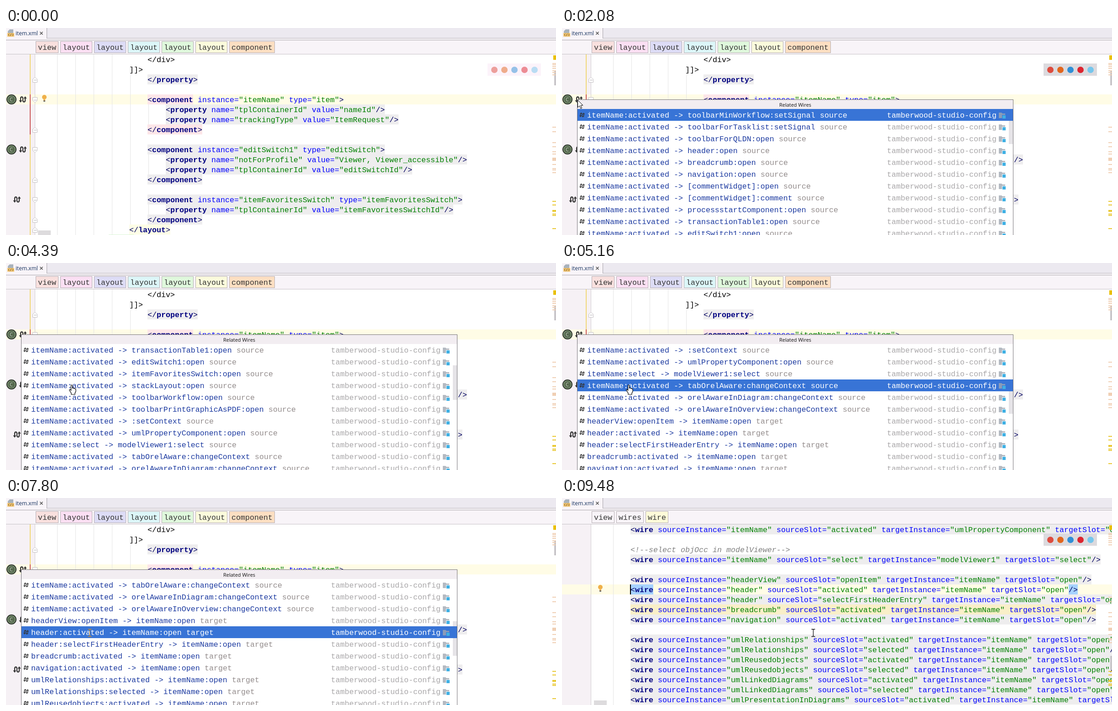
These frames come from a looping animation (1205 px wide and 455 px high, 9560 ms). An HTML page with a canvas:

```html
<!DOCTYPE html>
<html lang="en">
<head>
<meta charset="utf-8">
<title>Related wires</title>
<style>
  html, body { margin: 0; width: 100%; height: 100%; overflow: hidden; background: #fff; }
  canvas { display: block; }
</style>
</head>
<body>
<canvas id="stage" width="1205" height="455"></canvas>
<script>
const ctx = document.getElementById('stage').getContext('2d');
const LOOP = 9560, W = 1205, H = 455, CHAR = 10, LINE = 22, ROW = 26;
const POPUP_OPEN = 1935, POPUP_CLOSE = 7890, CRUMBS_CHANGE = 8220;
const MONO = '16.667px "Liberation Mono", monospace';
const SANS = '"Open Sans", "Noto Sans", sans-serif';
const GREY = '#eeedee', PINK = '#fde6e8', CURRENT = '#fffce6', PICKED = '#a6d2ff';

// ---------- content ----------
const component = (name, type) => `<component instance="${name}" type="${type}">`;
const property = (name, value) => `<property name="${name}" value="${value}"/>`;
const wire = (from, slot, to = 'itemName', target = 'open') =>
  `<wire sourceInstance="${from}" sourceSlot="${slot}" targetInstance="${to}" targetSlot="${target}"/>`;

// Line number, x, text, background
const layoutLines = [
  [0, 310, '</div>'],
  [1, 270, ']]>'],
  [2, 310, '</property>', GREY],
  [4, 310, component('itemName', 'item')],
  [5, 350, property('tplContainerId', 'nameId'), GREY],
  [6, 350, property('trackingType', 'ItemRequest'), GREY],
  [7, 310, '</component>', PINK],
  [9, 310, component('editSwitch1', 'editSwitch'), GREY],
  [10, 350, property('notForProfile', 'Viewer, Viewer_accessible'), GREY],
  [11, 350, property('tplContainerId', 'editSwitchId'), GREY],
  [12, 310, '</component>', GREY],
  [14, 310, component('itemFavoritesSwitch', 'itemFavoritesSwitch'), GREY],
  [15, 350, property('tplContainerId', 'itemFavoritesSwitchId'), GREY],
  [16, 310, '</component>', GREY],
  [17, 270, '</layout>', '#fdfde6']
];

const wireLines = [
  [0, wire('itemName', 'activated', 'umlPropertyComponent')],
  [2, '<!--select objOcc in modelViewer-->'],
  [3, wire('itemName', 'select', 'modelViewer1', 'select')],
  [5, wire('headerView', 'openItem')],
  [6, wire('header', 'activated')],
  [7, wire('header', 'selectFirstHeaderEntry')],
  [8, wire('breadcrumb', 'activated')],
  [9, wire('navigation', 'activated')],
  [11, wire('umlRelationships', 'activated')],
  [12, wire('umlRelationships', 'selected')],
  [13, wire('umlReusedobjects', 'activated')],
  [14, wire('umlReusedobjects', 'selected')],
  [15, wire('umlLinkedDiagrams', 'activated')],
  [16, wire('umlLinkedDiagrams', 'selected')],
  [17, wire('umlPresentationInDiagrams', 'activated')]
].map(([n, text]) => [n, 150, text, n === 2 || n === 6 ? null : n === 8 ? '#f9efc8' : GREY]);

const outgoing = `toolbarMinWorkflow:setSignal toolbarForTasklist:setSignal toolbarForQLDN:open
  header:open breadcrumb:open navigation:open [commentWidget]:open [commentWidget]:comment
  processstartComponent:open transactionTable1:open editSwitch1:open itemFavoritesSwitch:open
  stackLayout:open toolbarWorkflow:open toolbarPrintGraphicAsPDF:open :setContext
  umlPropertyComponent:open modelViewer1:select tabOrelAware:changeContext
  orelAwareInDiagram:changeContext orelAwareInOverview:changeContext`.split(/\s+/);
const incoming = `headerView:openItem header:activated header:selectFirstHeaderEntry
  breadcrumb:activated navigation:activated umlRelationships:activated
  umlRelationships:selected umlReusedobjects:activated`.split(/\s+/);
const entries = [
  ...outgoing.map(o => [`itemName:${o.endsWith(':select') ? 'select' : 'activated'} -> ${o}`, 'source']),
  ...incoming.map(i => [`${i} -> itemName:open`, 'target'])
];

// ---------- timeline ----------
const selection = [[0, 0], [2840, 1], [3025, 2], [3205, 3], [5160, 18], [5940, 21], [6990, 22]];
const scrolling = [[0, 0], [3600, 3], [3990, 6], [4390, 9], [4620, 12], [4850, 15], [5470, 18]];
const valueAt = (keys, t) => keys.filter(k => k[0] <= t).pop()[1];

// First step, last step, number of steps, end x, end y, shape
const moves = [
  [370, 610, 3, 393, 289, 'beam'],
  [990, 1365, 4, 112, 190, 'beam'],
  [1490, 1490, 1, 40, 164, 'arrow'],
  [1790, 1790, 1, 35, 157, 'hand'],
  [1935, 1935, 1, 34, 158, 'arrow'],
  [2570, 3210, 8, 144, 268, 'hand'],
  [5160, 5160, 1, 146, 268, 'hand'],
  [5940, 5940, 1, 148, 267, 'hand'],
  [6030, 6330, 3, 160, 267, 'hand'],
  [6720, 7260, 5, 182, 295, 'hand'],
  [7650, 7650, 1, 183, 297, 'beam'],
  [8220, 9090, 11, 550, 297, 'beam']
];

function pointerAt(t) {
  let x = 1035, y = 478, shape = 'beam';
  for (const [start, end, steps, toX, toY, kind] of moves) {
    if (t < start) break;
    const gap = (end - start) / Math.max(1, steps - 1);
    const done = Math.min(steps, gap ? Math.floor((t - start) / gap + 1.01) : 1) / steps;
    x += (toX - x) * done;
    y += (toY - y) * done;
    shape = kind;
  }
  return { x: Math.round(x), y: Math.round(y), shape };
}

const ramp = (t, start, length) => Math.max(0, Math.min(1, (t - start) / length));
const panelAlpha = t => ramp(t, 990, 250) - ramp(t, 4070, 230) + ramp(t, 8220, 280);

// ---------- drawing helpers ----------
function rect(x, y, w, h, color) {
  ctx.fillStyle = color;
  ctx.fillRect(x, y, w, h);
}

function text(str, x, y, color, font = MONO) {
  ctx.font = font;
  ctx.fillStyle = color;
  ctx.fillText(str, x, y);
}

function circle(x, y, r, color) {
  ctx.fillStyle = color;
  ctx.beginPath();
  ctx.arc(x, y, r, 0, 7);
  ctx.fill();
}

function shape(path, x, y, { fill, stroke, width = 1, scale = 1 }) {
  const outline = new Path2D(path);
  ctx.save();
  ctx.translate(x, y);
  ctx.scale(scale, scale);
  ctx.lineWidth = width;
  if (fill) { ctx.fillStyle = fill; ctx.fill(outline); }
  if (stroke) { ctx.strokeStyle = stroke; ctx.stroke(outline); }
  ctx.restore();
}

function wireIcon(x, y, scale = 1) {
  shape('M-5 4V-2Q-5-5.5-2.5-5.5T0-2V2Q0 5.5 2.5 5.5T5 2V-4', x, y, { stroke: '#333', width: 2.3, scale });
  shape('M-8.5 2H-1.5L-5 7ZM1.5-2H8.5L5-7Z', x, y, { fill: '#333', scale });
}

function bulb(y) {
  circle(84, y - 2, 5, '#efb04a');
  rect(82, y + 3, 4, 2, '#efb04a');
  rect(82, y + 5, 4, 3, '#77736f');
}

const lineTop = n => 58 + LINE * n;

function codeLine([n, x, str, background]) {
  const y = lineTop(n), baseline = y + 17;
  if (background) rect(x, y, str.length * CHAR, LINE, background);
  if (str.startsWith('<!--')) return text(str, x, baseline, '#808080', 'italic ' + MONO);
  if (str === '</div>' || str === ']]>') return text(str, x, baseline, '#000');
  let afterBracket = false;
  for (const token of str.match(/"[^"]*"|<\/?|\/?>|\w+|./g)) {
    const color = token[0] === '"' ? '#008000' : afterBracket ? '#000080'
      : /[\w=]/.test(token) ? '#0000ff' : '#000060';
    text(token, x, baseline, color, (afterBracket ? 'bold ' : '') + MONO);
    x += token.length * CHAR;
    afterBracket = token[0] === '<';
  }
}

// ---------- scene parts ----------
function header(t) {
  rect(0, 0, W, 57, '#f8f4f8');
  rect(90, 0, W - 90, 22, '#ece9f0');
  rect(90, 22, W - 90, 1, '#b5b2b8');
  rect(89, 0, 1, 23, '#a5a2a8');
  rect(0, 26, W, 1, '#aaa7ac');
  rect(0, 57, W, 1, '#c6c2c6');

  shape('M8 3H16V11H4V7Z', 0, 0, { fill: '#a9b3bc' });
  rect(3, 11, 15, 8, '#f2c46f');
  shape('M7.5 12.5L5 15L7.5 17.5M13.5 12.5L16 15L13.5 17.5M11.5 12.5L9.5 17.5', 0, 0, { stroke: '#6a5530' });
  text('item.xml', 21, 16, '#14305e', '12px ' + SANS);
  shape('M-3-3L3 3M3-3L-3 3', 77.5, 11.5, { stroke: '#555', width: 1.6 });

  const crumbs = t < CRUMBS_CHANGE
    ? [['view', '#f9e0de'], ['layout', '#fbdff3'], ['layout', '#dddcf6'], ['layout', '#dcf6f8'],
       ['layout', '#dff8dc'], ['layout', '#fbfbdc'], ['component', '#fddfc2']]
    : [['view', '#f8f4f8'], ['wires', '#f8f4f8'], ['wire', '#fefbd9']];
  let x = 65;
  for (const [label, color] of crumbs) {
    const width = label.length * CHAR + 10;
    rect(x, 29, width, 26, '#b5aeb2');
    rect(x + 1, 30, width - 2, 24, color);
    text(label, x + 5, 48, '#333');
    x += width + 4;
  }
}

function gutter(currentLine) {
  rect(0, 58, 63, H, '#f6f1f5');
  rect(0, lineTop(currentLine), W, LINE, CURRENT);
  rect(63, 58, 1, H, '#d0ccd0');
  rect(112, 58, 1, H, '#e4e4e4');
}

function layoutEditor(showsBulb) {
  gutter(4);
  for (const x of [152, 192, 232]) rect(x, 58, 1, H, '#e4e4e4');
  rect(272, 104, 1, 330, '#e4e4e4');
  for (const [y, h] of [[168, 44], [278, 44], [388, 22]]) rect(312, y, 1, h, '#e4e4e4');
  rect(52, 58, 2, H, '#f0d878');
  rect(52, 146, 2, 88, '#cc5a5a');
  rect(310, lineTop(4), 100, LINE, PINK);
  layoutLines.forEach(codeLine);
  rect(225, 454, 55, 1, '#d9f5d5');

  for (const n of [4, 9, 14]) shape('M-5-5H5V2L0 6L-5 2Z', 63.5, lineTop(n) + 11.5, { fill: '#fff', stroke: '#c4c0c4' });
  for (const n of [2, 7, 12, 16, 17]) shape('M-5 5H5V-2L0-6L-5-2Z', 63.5, lineTop(n) + 12.5, { fill: '#fff', stroke: '#c4c0c4' });
  for (const n of [2, 4, 7, 9, 12, 14, 16, 17]) rect(61, lineTop(n) + 12, 6, 1, '#b4b0b4');

  for (const y of [157, 267]) {
    circle(12, y, 11, '#2e352c');
    circle(12, y, 9, '#86a07e');
    circle(12, y, 7.5, '#56694f');
    text('C', 8, y + 4, '#c8d2c4', '11px ' + SANS);
    wireIcon(37, y);
  }
  wireIcon(24, 377);
  if (showsBulb) bulb(154);
}

function wiresEditor(t) {
  gutter(6);
  rect(150, lineTop(6), 50, LINE, PICKED);
  rect(1110, lineTop(6), 20, LINE, PICKED);
  wireLines.forEach(codeLine);
  bulb(198);
  if (Math.floor((t - 7970) / 500) % 2) rect(149, lineTop(6), 2, LINE, '#000');
}

function errorStripe(showsWires) {
  rect(1201, showsWires ? 347 : 95, 4, 31, '#c9c7ca');
  rect(1199, 60, 6, 10, '#e9c00c');
  for (const y of [77, 80, 84, 88, 93, 97, 102, 217, 227, 251, 260, 271, 276, 299, 308, 311, 317])
    rect(1197, y, 8, 2, '#f0cfb4');
  rect(1197, 285, 8, 7, '#f0cfb4');
  for (const y of [380, 388, 400, 402, 408, 411]) rect(1197, y, 8, 2, '#e9c832');
  if (!showsWires) rect(1197, 440, 8, 2, '#e9c832');
  rect(70, 445, 28, 10, '#dddbdd');
}

function browserPanel(t) {
  const faint = t < 990;
  const buttons = alpha => {
    ctx.globalAlpha = alpha;
    ['#dd4b3e', '#e2661e', '#2f8fd6', '#dd2530', '#76c6ec'].forEach((color, i) => circle(1070 + 22 * i, 92, 7, color));
  };
  ctx.save();
  if (faint) {
    rect(1055, 78, 117, 27, '#fcf3fa');
    if (t < 70) buttons(.5);
  } else {
    ctx.globalAlpha = panelAlpha(t);
    rect(1055, 78, 117, 27, '#dcdade');
    buttons(panelAlpha(t));
  }
  ctx.restore();
}

function popup(t) {
  const top = valueAt(scrolling, t), selected = valueAt(selection, t);
  rect(33, 157, 956, H, '#77757a');
  rect(34, 158, 954, 20, '#f2edf1');
  rect(34, 178, 954, H, '#fff');
  ctx.textAlign = 'center';
  text('Related Wires', 511, 173, '#111', '11px ' + SANS);
  ctx.textAlign = 'left';
  rect(979, 179 + top * 5.1, 9, 76, '#e5e3e7');

  entries.slice(top, top + 11).forEach(([label, kind], i) => {
    const y = 178 + ROW * i, active = top + i === selected;
    if (active) rect(34, y, 954, ROW, '#3874d6');
    wireIcon(44, y + 13, .7);
    text(label, 55, y + 19, active ? '#fff' : '#1c3aa0');
    text(kind, 55 + (label.length + 1) * CHAR, y + 19, active ? '#fff' : '#938c8c');
    text('tamberwood-studio-config', 712, y + 19, active ? '#fff' : '#a9a7a9');
    shape('M957 8H963L965 10H971V20H957Z', 0, y, { fill: active ? '#8a9cb8' : '#b4bac2' });
    rect(964, y + 13, 9, 8, active ? '#3874d6' : '#fff');
    rect(965, y + 14, 7, 7, '#3fb0e4');
  });
}

function pointer(t) {
  const { x, y, shape: kind } = pointerAt(t);
  if (kind === 'beam') {
    const overBlue = t >= 7650 && t < POPUP_CLOSE;
    shape('M-4-8.5H-1L0-7.5L1-8.5H4M0-7.5V6.5M-4 7.5H-1L0 6.5L1 7.5H4', x + .5, y,
      { stroke: overBlue ? '#c08a3a' : '#111', width: 1.3 });
  } else if (kind === 'arrow') {
    shape('M0 0V16L4 12.5L6.5 18.5L9 17.5L6.5 11.5H11.5Z', x + .5, y + .5, { fill: '#fff', stroke: '#000' });
  } else {
    shape('M-1.5 1Q0-1 1.5 1V7Q3 5.5 4 7.5Q6 6.5 6.5 8.5Q9 8 9 10.5V14Q8 17 7 18V21H-1V18L-5 12Q-5.5 9.5-3 10L-1.5 12Z',
      x, y, { fill: '#fff', stroke: '#000', width: 1.2 });
  }
}

function render(t) {
  const showsWires = t >= POPUP_CLOSE;
  const showsPopup = t >= POPUP_OPEN && !showsWires;
  rect(0, 0, W, H, '#fff');
  showsWires ? wiresEditor(t) : layoutEditor(!showsPopup);
  errorStripe(showsWires);
  header(t);
  browserPanel(t);
  if (showsPopup) popup(t);
  pointer(t);
}

const began = performance.now();
function tick() {
  render((performance.now() - began) % LOOP);
  requestAnimationFrame(tick);
}
tick();
</script>
</body>
</html>
```
